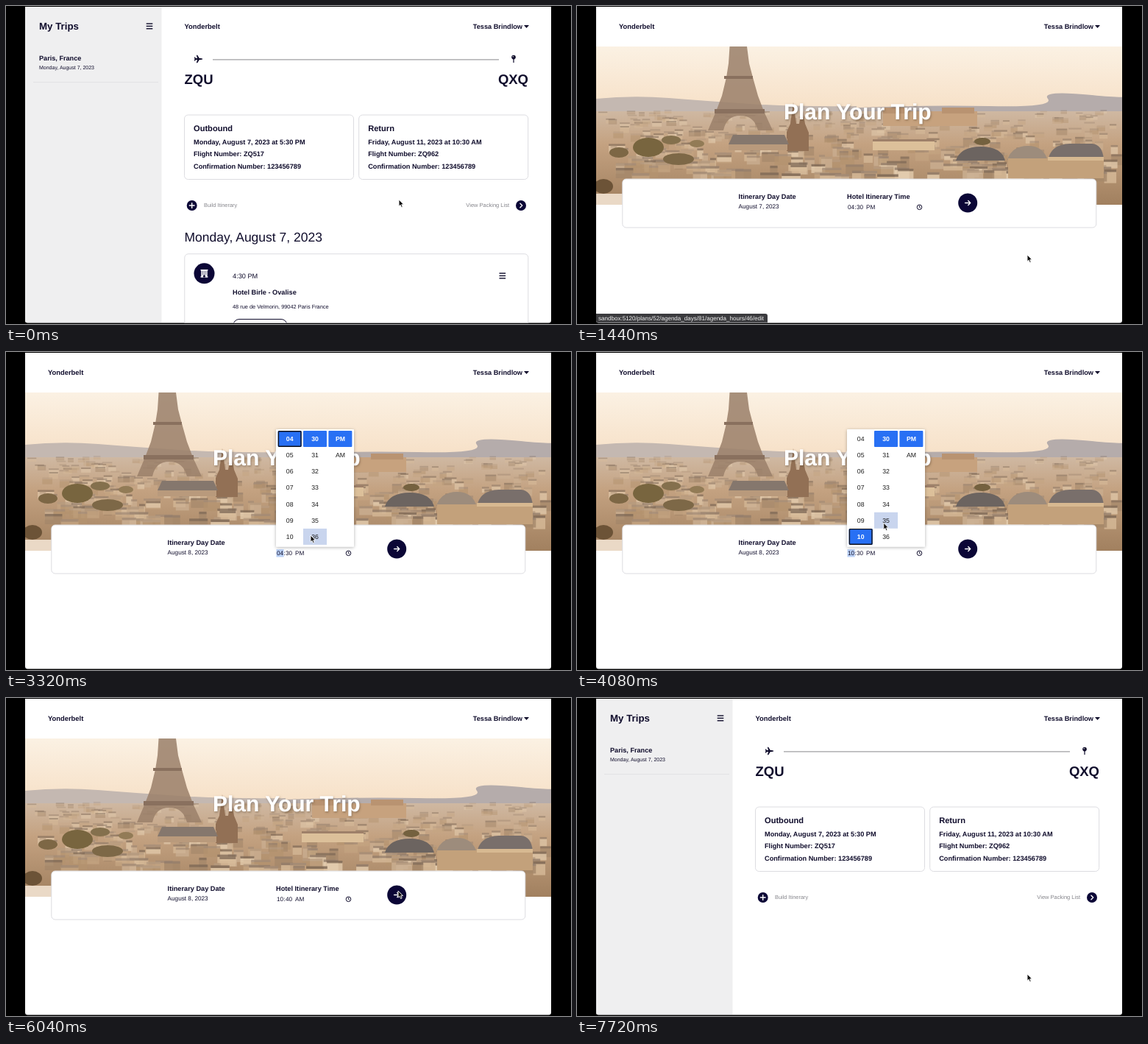
An HTML page for the animation above (7.76 s loop, 768x432 px).

```html
<!DOCTYPE html>
<html lang="en">
<head>
<meta charset="utf-8">
<title>Trip planner</title>
<style>
html, body { margin: 0; width: 100%; height: 100%; overflow: hidden; background: #000; }
svg { display: block; width: 768px; height: 432px; }
text { font-family: "Liberation Sans", Arial, sans-serif; text-rendering: geometricPrecision; white-space: pre; }
</style>
</head>
<body>
<svg id="stage" viewBox="0 0 768 432" xmlns="http://www.w3.org/2000/svg"></svg>
<script>
const LOOP = 7760, STEP = 40;
const NAVY = '#0b0636', INK = '#100d2c', BLUE = '#2870f4';

const text = (x, y, str, size = 9.2, { bold = false, fill = INK, anchor = 'start', extra = '' } = {}) =>
  `<text x="${x}" y="${y}" font-size="${size}" font-weight="${bold ? 700 : 400}" fill="${fill}" text-anchor="${anchor}" ${extra}>${str}</text>`;
const bold = (x, y, str, size, opts) => text(x, y, str, size, { bold: true, ...opts });
const rect = (x, y, w, h, fill, extra = '') =>
  `<rect x="${x}" y="${y}" width="${w}" height="${h}" fill="${fill}" ${extra}/>`;
const circle = (x, y, r, fill, extra = '') => `<circle cx="${x}" cy="${y}" r="${r}" fill="${fill}" ${extra}/>`;
const ellipse = (x, y, rx, ry, fill) => `<ellipse cx="${x}" cy="${y}" rx="${rx}" ry="${ry}" fill="${fill}"/>`;
const path = (d, fill = 'none', extra = '') => `<path d="${d}" fill="${fill}" ${extra}/>`;
const line = (d, color, width = 1) =>
  path(d, 'none', `stroke="${color}" stroke-width="${width}" stroke-linecap="round" stroke-linejoin="round"`);
const card = (x, y, w, h) => rect(x, y, w, h, '#fff', 'rx="5" stroke="#dcdce0"');
const group = (id, body, extra = '') => `<g id="${id}" ${extra}>${body}</g>`;
const bars = (x, y) => [-3.4, 0, 3.4].map(d => rect(x - 4.3, y + d - .7, 8.6, 1.4, INK)).join('');

function randomizer(seed) {
  return () => (seed = (seed * 16807) % 2147483647) / 2147483647;
}

const header = x =>
  bold(x, 31, 'Yonderbelt', 9.4) +
  bold(702, 31, 'Tessa Brindlow', 9.2, { anchor: 'end' }) +
  path('M704 26h7l-3.5 4z', INK);

function flightCard(x, title, date, flight) {
  return card(x, 148, 230, 87.5) + bold(x + 12.5, 170, title, 11.1) +
    bold(x + 12.5, 187.5, date) +
    bold(x + 12.5, 204.3, 'Flight Number: ' + flight) +
    bold(x + 12.5, 220.7, 'Confirmation Number: 123456789');
}

function tripPage() {
  const plane = path('M267.5 72q-1-1.1-3-1.1h-1.6l-2.7-4.2h-1.4l1.3 4.2h-2l-1.2-1.4h-1.1l.7 2.5-.7 2.5h1.1l1.2-1.4h2l-1.3 4.2h1.4l2.7-4.2h1.6q2 0 3-1.1z', INK);
  const pin = circle(690, 69.6, 2.8, INK) + rect(689.4, 71, 1.2, 6, INK) + circle(689.2, 68.8, .7, '#fff');
  return rect(26, 1, 185.5, 429, '#efeff0') +
    bold(45, 32, 'My Trips', 13.3) + bars(195, 27.4) +
    bold(45, 74, 'Paris, France', 9.15) +
    text(45, 86, 'Monday, August 7, 2023', 7) +
    rect(37, 103, 170, 1, '#e2e2e4') +
    header(242.5) + plane + pin + rect(281, 72.4, 389, 1, '#88888c') +
    bold(242.5, 106.2, 'ZQU', 18.5) + bold(710, 106.2, 'QXQ', 18.5, { anchor: 'end' }) +
    flightCard(242.5, 'Outbound', 'Monday, August 7, 2023 at 5:30 PM', 'ZQ517') +
    flightCard(479.7, 'Return', 'Friday, August 11, 2023 at 10:30 AM', 'ZQ962') +
    circle(252.7, 271, 7, NAVY) + line('M249.3 271h6.8M252.7 267.6v6.8', '#fff', 1.4) +
    text(269, 273.3, 'Build Itinerary', 7.4, { fill: '#85858b' }) +
    text(684, 273.3, 'View Packing List', 7.5, { fill: '#85858b', anchor: 'end' }) +
    circle(700, 271, 7, NAVY) + line('M698.9 268.2l2.8 2.8-2.8 2.8', '#fff', 1.4);
}

function itinerary() {
  let hotel = rect(265.3, 358.6, 8.4, 9.8, '#fff') + rect(264.5, 358, 10, 1.4, '#fff') + rect(264.5, 367.4, 10, 1.3, '#fff');
  for (const y of [360.8, 363.3]) for (const x of [266.6, 268.8, 271]) hotel += rect(x, y, 1.3, 1.2, NAVY);
  hotel += path('M268 368.5v-1.7a1.5 1.5 0 0 1 3 0v1.7z', NAVY);
  return text(242.5, 320, 'Monday, August 7, 2023', 17.5) +
    card(242.8, 336.8, 467, 120) + circle(269.5, 363.3, 14, NAVY) + hotel +
    text(308, 369.8, '4:30 PM') + bars(674.8, 366.5) +
    bold(308, 392.4, 'Hotel Birle - Ovalise') +
    text(308, 411, '48 rue de Velmorin, 99042 Paris France', 7.4) +
    rect(309, 425.5, 73, 18, '#fff', `rx="8" stroke="${INK}"`);
}

function cityscape() {
  const rnd = randomizer(4711);
  const walls = ['#d9bd9b', '#c5a582', '#e6cfb1', '#b4936f', '#a4876a', '#cdb295'];
  const roofs = ['#927c6a', '#a38b76', '#7d6856', '#b69b80'];
  let art = rect(26, 55, 715, 215, 'url(#sky)') +
    path('M26 126Q75 121 125 125T235 133T380 136V158H26z', '#c4b8b1') +
    path('M360 139Q470 134 560 136T640 126T700 121T741 117V158H360z', '#b5acab') +
    rect(26, 143, 715, 127, 'url(#city)');
  for (let i = 0; i < 380; i++) {
    const depth = i / 380, y = 143 + 88 * depth ** 1.15;
    const w = 7 + 20 * depth * rnd() + 5 * rnd(), h = 3 + 11 * depth * (.4 + rnd());
    const x = 26 + rnd() * (715 - w);
    art += `<g opacity="${(.35 + .45 * depth).toFixed(2)}">` +
      rect(x.toFixed(1), y.toFixed(1), w.toFixed(1), h.toFixed(1), walls[i % 6]) +
      rect(x.toFixed(1), (y - 2).toFixed(1), w.toFixed(1), (1.5 + 2 * depth).toFixed(1), roofs[i % 4]) + '</g>';
  }
  const palace = rect(416, 143, 128, 20, '#c7a27e') + rect(416, 138, 32, 8, '#b99371') + rect(496, 138, 44, 8, '#b99371');
  const tower = path('M207.5 55H231L234 78 239 97 246 122 254 143 266 169H246Q241 149 222 149T199 169H178L189 143 197 122 203 97 206 78z', '#9b806b', 'opacity=".86"') +
    rect(200, 95, 39, 4, '#89705e') + rect(187, 140, 68, 6, '#89705e');
  const church = path('M285 197V171L290 160 294 131 298 160H302L306 136 310 160 315 172V197z', '#927055');
  const halls = rect(206, 180, 80, 16, '#b99a7c') + path('M206 188L212 175H282L288 188z', '#85776d') +
    rect(402, 183, 84, 13, '#dcc09a') + rect(402, 181, 84, 3, '#9e8069');
  const trees = ellipse(97, 192, 21, 13, '#78653f') + ellipse(57, 199, 13, 7, '#7d6745') +
    ellipse(128, 182, 13, 6, '#84704d') + ellipse(138, 208, 21, 8, '#7d6847') +
    ellipse(163, 187, 10, 5, '#927b56') + ellipse(36, 245, 13, 10, '#6c5337') + ellipse(551, 184, 11, 5, '#74613f');
  const domes = path('M515 210Q521 191 549 191T582 210z', '#6c6460') +
    path('M585 209Q591 190 613 190T640 211z', '#9d8c7c') +
    path('M640 211Q643 188 670 187H700Q714 188 716 208z', '#796f6b') +
    rect(586, 207, 130, 27, '#c3a17b') + rect(640, 205, 76, 5, '#d7b991');
  return art + palace + tower + church + halls + trees + domes + rect(26, 255, 36, 15, '#ead9c6');
}

function editPage() {
  return header(57) + cityscape() +
    bold(281, 153.6, 'Plan Your Trip', 30, { fill: '#fff', extra: 'filter="url(#glow)"' }) +
    card(61.8, 235, 644, 66) +
    bold(219.6, 262, 'Itinerary Day Date') + bold(367, 262, 'Hotel Itinerary Time') +
    circle(465.5, 273.3, 3.3, 'none', `stroke="${INK}"`) + line('M465.5 271.3v2.2l1.4.7', INK, .8) +
    circle(531.2, 267.5, 13, NAVY) + line('M527.6 267.5h7M531.8 264.6l2.9 2.9-2.9 2.9', '#fff', 1.4) +
    group('fields', '');
}

function calendar() {
  const column = i => 234 + i * 20, mid = { anchor: 'middle', fill: '#222' };
  let out = rect(220, 110, 148, 145, '#fff', 'stroke="#b9b9bb" filter="url(#lift)"') +
    rect(220, 110, 148, 37, '#ececed') + rect(220, 146.5, 148, .8, '#d4d4d6') +
    line('M234 116.5l-5 4.5 5 4.5M354 116.5l5 4.5-5 4.5', '#bdbdc0', 1.6) +
    bold(294, 124.2, 'August 2023', 9.1, { anchor: 'middle', fill: '#111' });
  'Su Mo Tu We Th Fr Sa'.split(' ').forEach((d, i) => out += text(column(i), 139.2, d, 7.9, mid));
  out += rect(245.7, 173, 16.4, 16.4, '#2f66b1', 'rx="2"') + rect(265.7, 173, 16.4, 16.4, '#ececee', 'rx="2"');
  for (let i = 0; i < 35; i++) {
    const day = (i + 29) % 31 + 1;
    out += text(column(i % 7), 163.8 + 20 * Math.floor(i / 7), i < 33 ? day : i - 32, 7.9,
      { ...mid, bold: i === 7, fill: i === 8 ? '#fff' : '#222' });
  }
  return out;
}

// Cursor tip: time, x, y
const TRACK = [
  [0, 534, 263], [120, 534, 263], [560, 674, 364], [760, 674, 364], [1080, 612, 338], [1480, 612, 338],
  [1900, 267, 254], [2040, 267, 254], [2300, 274, 178], [2480, 274, 178], [2880, 465, 270], [3080, 465, 270],
  [3320, 414, 249], [3480, 385, 247], [3700, 385, 247], [4100, 417, 232], [4800, 417, 232], [4960, 417, 214],
  [5080, 417, 214], [5280, 453, 138], [5400, 453, 138], [5640, 510, 286], [5920, 533, 262], [6320, 533, 262],
  [6900, 612, 375], [LOOP, 612, 375]
];
const smooth = p => { p = Math.min(1, Math.max(0, p)); return p * p * (3 - 2 * p); };
function cursorAt(t) {
  const i = TRACK.findIndex(k => k[0] > t);
  const [t0, x0, y0] = TRACK[i - 1], [t1, x1, y1] = TRACK[i];
  const p = smooth((t - t0) / (t1 - t0));
  return [x0 + (x1 - x0) * p, y0 + (y1 - y0) * p];
}

const ROW = 22.15, pad = n => String(n).padStart(2, '0');
const within = (t, from, to) => t >= from && t < to;

function timeState(t) {
  return {
    hour: t >= 3600 ? 10 : 4,
    minute: t >= 5020 ? 40 : 30,
    half: t >= 5340 ? 'AM' : 'PM',
    focus: t < 5020 ? 0 : t < 5340 ? 1 : 2,
    open: within(t, 3040, 5520)
  };
}

function picker(t, state, [cx, cy]) {
  const scroll = 122 * smooth((t - 4360) / 340);
  const hitScroll = t < 4800 ? 0 : scroll;
  const range = (from, n) => Array.from({ length: n }, (_, i) => pad(from + i));
  const columns = [
    { x: 369.7, items: range(4, 7), chosen: pad(state.hour), shift: 0, hit: 0 },
    { x: 404, items: range(30, 14), chosen: pad(state.minute), shift: scroll, hit: hitScroll },
    { x: 438.4, items: ['PM', 'AM'], chosen: state.half, shift: 0, hit: 0 }
  ];
  let cells = '';
  columns.forEach(({ x, items, chosen, shift, hit }, c) => items.forEach((item, i) => {
    const top = 107 + i * ROW - shift, hitTop = 107 + i * ROW - hit;
    const on = item === chosen;
    const hover = cx >= x && cx < x + 32 && cy >= hitTop && cy < hitTop + ROW;
    if (on) cells += rect(x, top, 32, 22, BLUE, 'rx="1"');
    else if (hover) cells += rect(x, top, 32, 22, '#c9d5ee');
    if (on && state.focus === c) cells += rect(x + .7, top + .7, 30.6, 20.6, 'none', 'stroke="#101018" stroke-width="1.4" rx="1"');
    cells += text(x + 16, top + 14, item, 8.7, { anchor: 'middle', bold: on, fill: on ? '#fff' : '#1b1b1b' });
  }));
  return rect(367, 105, 106, 159.5, '#fff', 'rx="1" filter="url(#lift)"') + `<g clip-path="url(#list)">${cells}</g>`;
}

function fields(t, state) {
  const parts = [[368, 9.3, pad(state.hour)], [380, 9.3, pad(state.minute)], [393, 12.6, state.half]];
  let out = text(219.6, 274.6, `August ${t >= 2440 ? 8 : 7}, 2023`, 8.2);
  parts.forEach(([x, w, str], i) => {
    if (state.open && state.focus === i) out += rect(x - .5, 268, w + .8, 10.5, '#b9d0f5');
    out += text(x, 276.3, str, 8.2);
  });
  return out + text(377.3, 276, ':', 8.2);
}

const stage = document.getElementById('stage');
stage.innerHTML = `<defs>
  <linearGradient id="sky" x1="0" y1="0" x2="0" y2="1"><stop stop-color="#fbf1e3"/><stop offset=".36" stop-color="#f7e2ca"/><stop offset="1" stop-color="#eed3b4"/></linearGradient>
  <linearGradient id="city" x1="0" y1="0" x2="0" y2="1"><stop stop-color="#cfb8a2"/><stop offset=".35" stop-color="#c4a281"/><stop offset="1" stop-color="#a1805f"/></linearGradient>
  <filter id="glow" x="-10%" y="-30%" width="120%" height="170%"><feDropShadow dx="1" dy="1.5" stdDeviation="1.5" flood-color="#5a4632" flood-opacity=".5"/></filter>
  <filter id="lift" x="-10%" y="-10%" width="120%" height="125%"><feDropShadow dx="0" dy="1" stdDeviation="2" flood-opacity=".3"/></filter>
  <clipPath id="list"><rect x="367" y="107" width="106" height="155.5"/></clipPath>
  <clipPath id="window"><path d="M26 1H741V427q0 3.5-3.5 3.5H29.5q-3.5 0-3.5-3.5z"/></clipPath>
</defs>
<rect width="768" height="432" fill="#000"/>
<g clip-path="url(#window)">` +
  rect(26, 0, 715, 432, '#fff') +
  group('trip', tripPage() + group('itinerary', itinerary())) +
  group('edit', editPage()) + group('calendar', calendar()) + group('picker', '') +
  group('status', path('M26 418H256q3 0 3 3V431H26z', '#3b3b3e') +
    text(29, 426.8, 'sandbox:5120/plans/52/agenda_days/81/agenda_hours/46/edit', 8.05, { fill: '#f2f2f2' })) +
  rect(26, 429.8, 715, .8, '#bdbdc0') + '</g>' +
  group('cursor',
    group('arrow', path('M0 0V9.2L2.1 7.3 3.5 10.6 5.2 9.9 3.8 6.7H6.6z', '#111', 'stroke="#fff" stroke-width=".9"')) +
    group('hand', path('M-.6 1q0-1 .9-1t.9 1V4l4 .9q1 .3.9 1.5L5.4 10.6H.8L-2.6 6.8q-.3-1.2 1-1l1 .8z', '#fff', 'stroke="#111" stroke-width=".9"')));

const node = Object.fromEntries([...stage.querySelectorAll('g[id]')].map(g => [g.id, g]));
const show = (id, on) => node[id].style.display = on ? '' : 'none';

function render(t) {
  const editing = within(t, 1160, 6200), state = timeState(t), cursor = cursorAt(t);
  const hand = within(t, 2160, 2520);
  show('trip', !editing);
  show('itinerary', t < 1160);
  show('edit', editing);
  show('calendar', within(t, 1980, 2440));
  show('status', within(t, 960, 1600));
  show('arrow', !hand);
  show('hand', hand);
  node.fields.innerHTML = fields(t, state);
  node.picker.innerHTML = state.open ? picker(t, state, cursor) : '';
  node.cursor.setAttribute('transform', `translate(${cursor})`);
}

const start = performance.now();
function tick() {
  const t = (performance.now() - start) % LOOP;
  render(Math.floor(t / STEP) * STEP);
  requestAnimationFrame(tick);
}
tick();
</script>
</body>
</html>
```
